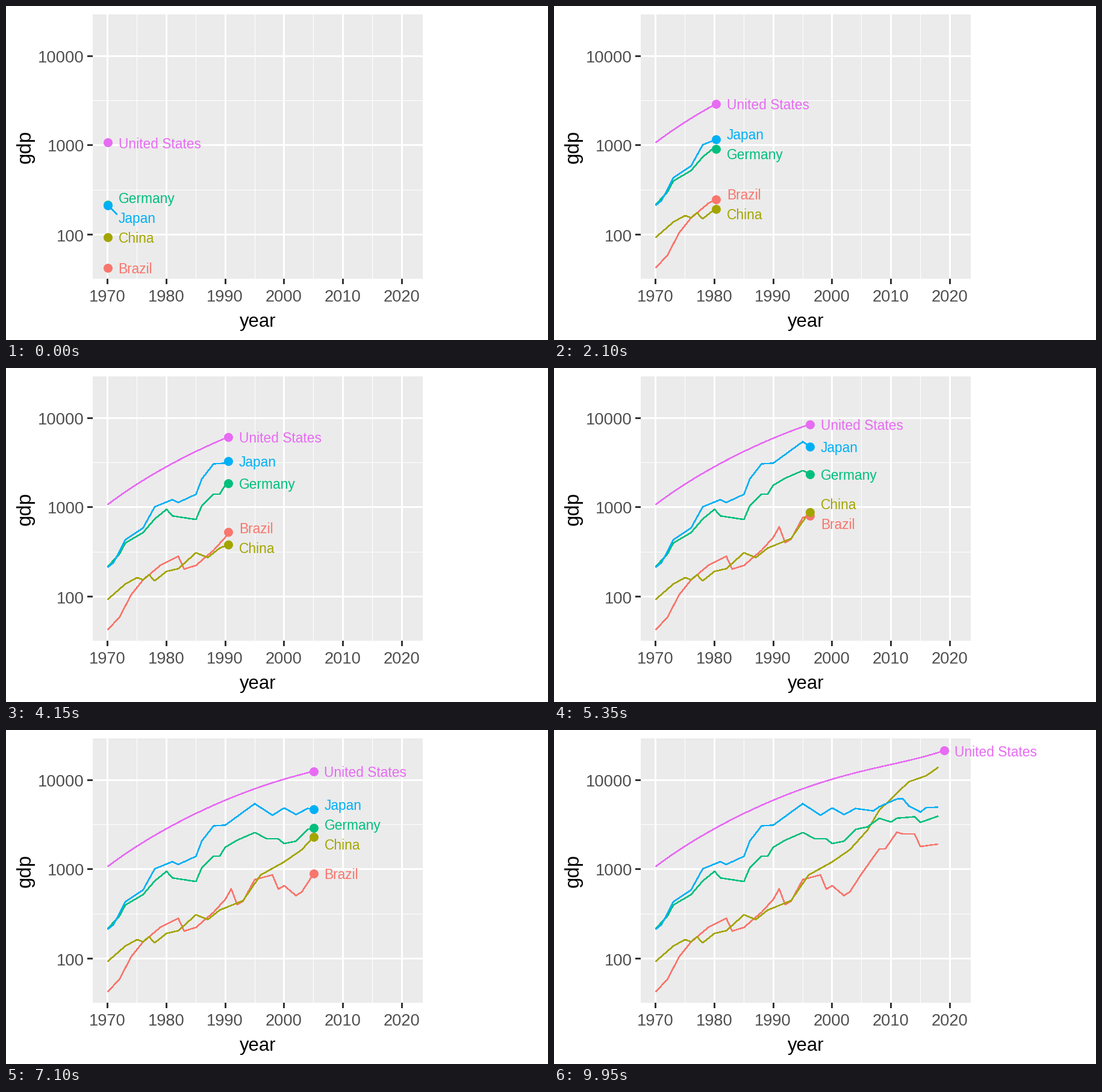
Recreate the animation shown at these times as a matplotlib script. Size 900 by 556 pixels, loop 10000 ms.

```python
import numpy as np
import matplotlib
import matplotlib.pyplot as plt
from matplotlib.animation import FuncAnimation
from matplotlib.patches import Rectangle

W, H, DPI = 900, 556, 64
PX = 72 / DPI                       # points per pixel
FRAMES, INTERVAL = 200, 50
LEFT, RIGHT, TOP, BOTTOM = 144, 692, 14, 454
GAP = 33                            # smallest distance between labels
YEARS = np.arange(50)
matplotlib.rcParams["font.family"] = "Liberation Sans"


def px(t):
    """Pixel column for t years after 1970."""
    return LEFT + (2.55 + t) * (RIGHT - LEFT) / 56.1


def py(log_gdp):
    """Pixel row for a base 10 logarithm of billions of dollars."""
    return 231.9 - 148.4 * (log_gdp - 3)


def bends(*points):
    """Yearly log values with constant growth between (year, gdp) turning points."""
    t, gdp = zip(*points)
    return np.interp(YEARS[:t[-1] + 1], t, np.log10(gdp))


def smooth(*points):
    """Yearly log values on one polynomial through (year, gdp) points."""
    t, gdp = zip(*points)
    return np.polyval(np.polyfit(t, np.log10(gdp), len(t) - 1), YEARS)


fig = plt.figure(figsize=(W / DPI, H / DPI), dpi=DPI, facecolor="white")
ax = fig.add_axes([0, 0, 1, 1])
ax.set_xlim(0, W)
ax.set_ylim(H, 0)
ax.axis("off")


def stroke(xs, ys, color, width, z, soft=True):
    return ax.plot(xs, ys, color=color, lw=width * PX, zorder=z, antialiased=soft,
                   snap=False, solid_capstyle="butt", solid_joinstyle="round")[0]


def write(x, y, text, size, color, ha="left", **kw):
    return ax.text(x, y, text, fontsize=size * PX, color=color, ha=ha,
                   va="baseline", zorder=8, **kw)


def mid(v):
    return np.floor(v) + 0.5


def draw_axes():
    ax.add_patch(Rectangle((LEFT, TOP), RIGHT - LEFT, BOTTOM - TOP,
                           fc="#EBEBEB", ec="none", zorder=0))
    for t in range(0, 51, 5):
        x, major = mid(px(t)), t % 10 == 0
        stroke([x, x], [TOP, BOTTOM], "white", 3 if major else 1, 1 + major)
        if major:
            stroke([x, x], [BOTTOM, BOTTOM + 9], "#333333", 3, 2)
            write(px(t) - 0.6, 491.5, str(1970 + t), 27.2, "#4D4D4D", "center")
    for e in (2, 2.5, 3, 3.5, 4):
        y, major = mid(py(e)), e % 1 == 0
        stroke([LEFT, RIGHT], [y, y], "white", 3 if major else 1, 1 + major)
        if major:
            stroke([LEFT - 9, LEFT], [y, y], "#333333", 3, 2)
            write(130, y + 11, str(10 ** e), 27.4, "#4D4D4D", "right")
    write(418, 534, "year", 31, "black", "center")
    write(41, 234, "gdp", 33, "black", "center", rotation=90, rotation_mode="anchor")


class Country:
    def __init__(self, name, color, logs):
        self.rows = py(logs)
        self.last = len(logs) - 1
        self.line = stroke([], [], color, 1.4, 3, False)
        self.link = stroke([], [], color, 1.4, 4, False)
        self.dot = ax.plot([], [], "o", color=color, ms=15 * PX, mew=0, zorder=5)[0]
        self.label = write(0, 0, name, 22.7, color)

    def row(self, t):
        return float(np.interp(t, YEARS[:self.last + 1], self.rows))

    def reveal(self, t):
        end = min(t, self.last)
        n = int(end) + 1
        self.line.set_data(px(np.append(YEARS[:n], end)),
                           np.append(self.rows[:n], self.row(end)))
        on = t <= self.last
        for part in (self.link, self.dot, self.label):
            part.set_visible(on)
        return on

    def place(self, t, y):
        x, row = px(t), self.row(t)
        self.dot.set_data([x], [row])
        self.label.set_position((x + 17.6, y + 9.2))
        dy = y - row
        if abs(dy) > 15:
            self.link.set_data([x, x + 15.5], [row, y - 5 * np.sign(dy)])
        else:
            self.link.set_data([], [])


def spread(rows, t):
    """Push sorted label rows apart; touching labels share one centred stack."""
    groups = []
    for r in rows:
        groups.append([r])
        while len(groups) > 1:
            a, b = groups[-2:]
            room = np.mean(b) - np.mean(a) - GAP * (len(a) + len(b)) / 2
            if room >= 0:
                break
            groups[-2:] = [a + b]
    out = []
    for g in groups:
        drift = -0.9 + 5 * max(0, 1 - t) if len(g) > 1 else 0
        out += [np.mean(g) + drift + GAP * (i - (len(g) - 1) / 2) for i in range(len(g))]
    return out


draw_axes()
countries = [
    Country("Brazil", "#F8766D", bends(
        (0, 42.3), (2, 58.5), (4, 105), (6, 153), (9, 225), (12, 282), (13, 203),
        (15, 223), (18, 330), (20, 462), (21, 603), (22, 401), (23, 438), (25, 769),
        (28, 864), (29, 600), (30, 655), (32, 508), (33, 558), (35, 892), (38, 1696),
        (39, 1690), (41, 2616), (42, 2490), (44, 2485), (45, 1802), (48, 1917))),
    Country("China", "#A3A500", bends(
        (0, 92.6), (3, 138), (5, 163), (6, 154), (7, 175), (8, 150), (10, 191),
        (12, 205), (15, 309), (17, 273), (19, 348), (23, 445), (26, 864), (30, 1211),
        (33, 1660), (36, 2752), (38, 4594), (43, 9570), (46, 11233), (48, 13895))),
    Country("Germany", "#00BF7D", bends(
        (0, 216), (2, 300), (3, 398), (6, 520), (8, 740), (10, 950), (11, 800),
        (15, 730), (16, 1046), (18, 1401), (19, 1399), (20, 1772), (22, 2120),
        (25, 2586), (27, 2212), (29, 2194), (30, 1943), (32, 2069), (34, 2809),
        (36, 2992), (38, 3730), (40, 3396), (41, 3744), (44, 3884), (45, 3360),
        (48, 3948))),
    Country("Japan", "#00B0F6", bends(
        (0, 213), (1, 240), (3, 432), (6, 586), (8, 1014), (11, 1219), (12, 1134),
        (15, 1399), (16, 2079), (18, 3072), (20, 3133), (25, 5449), (28, 4033),
        (30, 4888), (32, 4115), (34, 4815), (37, 4515), (38, 5038), (41, 6157),
        (42, 6203), (43, 5156), (45, 4389), (46, 4927), (48, 4971))),
    Country("United States", "#E76BF3", smooth(
        (0, 1073), (10, 2857), (20, 5963), (30, 10252), (40, 14992), (49, 21433))),
]
# every year starts on a whole frame
year_frames = np.round(YEARS * (FRAMES - 1) / YEARS[-1])


def update(k):
    t = float(np.interp(k, year_frames, YEARS))
    shown = [c for c in countries if c.reveal(t)]
    shown.sort(key=lambda c: c.row(t))
    for c, y in zip(shown, spread([c.row(t) for c in shown], t)):
        c.place(t, y)
    return []


anim = FuncAnimation(fig, update, frames=FRAMES, interval=INTERVAL, repeat=True)
plt.show()
```
